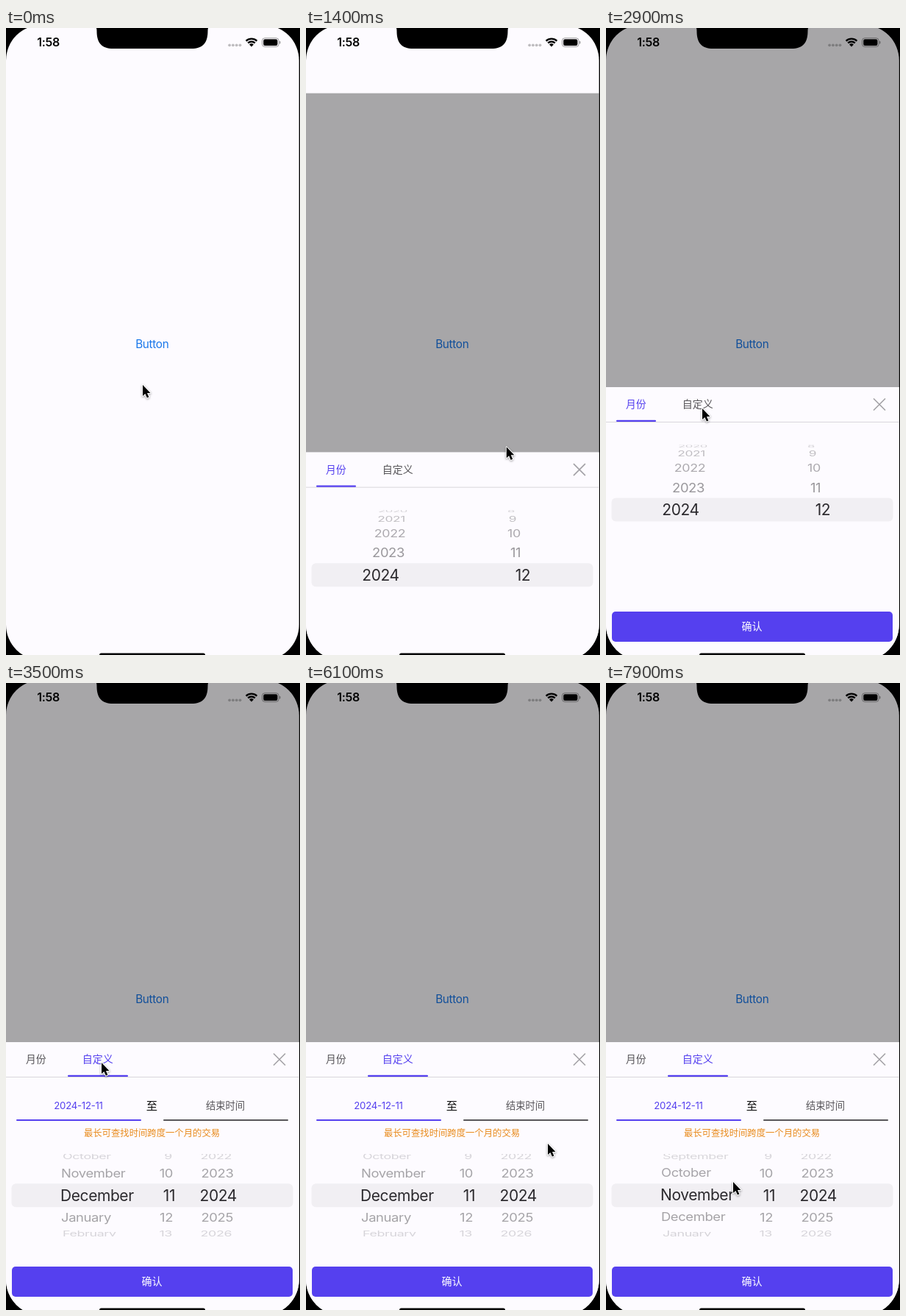
Write an HTML page with a canvas that moves like this. It is 400 px wide and 852 px high and loops after 8000 ms.

```html
<!DOCTYPE html>
<html lang="zh-CN">
<head>
<meta charset="utf-8">
<title>Date picker sheet</title>
<style>
html, body { margin: 0; width: 100%; height: 100%; overflow: hidden; background: #000; }
canvas { display: block; width: 400px; height: 852px; }
</style>
</head>
<body>
<canvas id="stage" width="400" height="852"></canvas>
<script>
const ctx = document.getElementById('stage').getContext('2d');
const W = 400, H = 852, LOOP = 8000, STEP = 100;
const FONT = 'Inter, "Noto Sans CJK SC", "Noto Sans CJK", sans-serif';
const PAPER = '#fdfbff', PURPLE = '#5540ef', GREY = '#58565a', INK = '#2b292d';
const MONTHS = ['January', 'February', 'March', 'April', 'May', 'June', 'July',
  'August', 'September', 'October', 'November', 'December'];

// time, x, y of the pointer tip
const POINTER = [
  [0, 186, 485], [100, 186, 485], [600, 196, 431], [950, 196, 433], [1200, 270, 565],
  [1900, 284, 587], [2600, 131, 517], [3000, 131, 517], [3500, 130, 516], [3800, 130, 516],
  [4600, 279, 655], [5100, 57, 518], [5300, 57, 518], [6100, 329, 626], [6400, 290, 618],
  [7000, 168, 647], [7200, 168, 647], [7650, 173, 678], [8000, 173, 678]
];
// time, month wheel position
const WHEEL = [[0, 12], [7200, 12], [7650, 11.1], [7900, 11.025], [8000, 11]];

function track(keys, t) {
  let i = 1;
  while (i < keys.length - 1 && keys[i][0] < t) i++;
  const a = keys[i - 1], b = keys[i];
  const u = Math.min(1, Math.max(0, (t - a[0]) / (b[0] - a[0])));
  const s = u * u * (3 - 2 * u);
  return a.slice(1).map((v, n) => v + (b[n + 1] - v) * s);
}

function text(str, x, y, size, color, align = 'center', weight = 400) {
  ctx.font = `${weight} ${size}px ${FONT}`;
  ctx.letterSpacing = /[\u4e00-\u9fff]/.test(str) ? '0px' : `${-0.02 * size}px`;
  ctx.textAlign = align;
  ctx.fillStyle = color;
  ctx.fillText(str, x, y);
}

function box(x, y, w, h, r, color) {
  ctx.fillStyle = color;
  ctx.beginPath();
  ctx.roundRect(x, y, w, h, r);
  ctx.fill();
}

function clipped(rects, draw) {
  ctx.save();
  ctx.beginPath();
  rects.forEach(r => ctx.rect(...r));
  ctx.clip();
  draw();
  ctx.restore();
}

// Cylinder wheel: flat magnified rows inside the bar, curved rows outside it.
function wheel(o) {
  const { mid, radius, angle, reach, rows, label, align, sel, side, drift, fade } = o;
  const pos = o.pos, near = Math.round(pos);
  const top = mid - 16, bottom = mid + 16;
  clipped([[0, top, W, 32]], () => {
    for (let i = near - 1; i <= near + 1; i++) {
      const s = label(i);
      if (s) text(s, sel, mid + (i - pos) * 32 + 7.6, 21, INK, align);
    }
  });
  clipped([[0, mid - reach, W, reach - 16], [0, bottom, W, reach - 16]], () => {
    for (let i = near - rows; i <= near + rows; i++) {
      const s = label(i), d = i - pos, k = Math.abs(d), a = d * angle;
      if (!s || Math.abs(a) > 1.5) continue;
      ctx.save();
      ctx.translate(side + drift * (k - 1), mid + radius * Math.sin(a));
      ctx.scale(1 - 0.03 * Math.max(0, k - 1), Math.cos(a) * 0.92 + 0.08);
      text(s, 0, 6.6, 18.4, `rgba(40,38,42,${fade(k)})`, align);
      ctx.restore();
    }
  });
}

function monthPage() {
  box(7.5, 638.5, 383, 32, 6, '#f1eff3');
  const drum = {
    mid: 654.5, radius: 87.7, angle: 0.349, reach: 88, rows: 4, align: 'center',
    fade: k => Math.max(0.1, 0.56 - 0.09 * k)
  };
  wheel({ ...drum, pos: 2024, label: i => i <= 2024 ? String(i) : '', sel: 101.5, side: 112, drift: 2 });
  wheel({ ...drum, pos: 12, label: i => i >= 1 && i <= 12 ? String(i) : '', sel: 295, side: 285, drift: -2 });
}

function customPage(month) {
  text('2024-12-11', 98.5, 578.6, 13.2, PURPLE);
  text('至', 198.5, 580, 15.3, '#111');
  text('结束时间', 298.5, 579, 13.3, GREY);
  box(14, 593, 170, 1.9, 1, PURPLE);
  box(214, 593, 170, 1.9, 1, GREY);
  text('最长可查找时间跨度一个月的交易', 198.5, 615.7, 12.35, '#e98b1c');

  box(7.5, 680.3, 383, 32, 6, '#f1eff3');
  const drum = {
    mid: 696, radius: 62, angle: 0.506, reach: 56, rows: 2,
    fade: k => Math.max(0.05, 0.64 - 0.23 * k)
  };
  wheel({ ...drum, pos: month, label: i => MONTHS[(i + 11) % 12], align: 'left', sel: 74, side: 75, drift: 2 });
  wheel({ ...drum, pos: 11, label: String, align: 'right', sel: 230, side: 227, drift: -1 });
  wheel({ ...drum, pos: 2024, label: String, align: 'left', sel: 263.5, side: 265.5, drift: -1 });
}

function sheet(t) {
  const custom = t >= 3000;
  ctx.fillStyle = 'rgba(0,0,0,.34)';
  ctx.fillRect(0, 0, W, 488);
  ctx.fillStyle = PAPER;
  ctx.fillRect(0, 488, W, 400);

  ctx.fillStyle = '#d9d7db';
  ctx.fillRect(0, 535, W, 1);
  text('月份', 40.8, 516.4, 13.8, custom ? GREY : PURPLE);
  text('自定义', 124.8, 516.4, 14, custom ? PURPLE : GREY);
  if (custom) box(84, 532.8, 82, 2.2, 1, PURPLE);
  else box(14, 532.8, 54, 2.2, 1, PURPLE);

  ctx.strokeStyle = '#a3a1a6';
  ctx.lineWidth = 1.6;
  ctx.beginPath();
  ctx.moveTo(364, 503.5); ctx.lineTo(380, 519.5);
  ctx.moveTo(380, 503.5); ctx.lineTo(364, 519.5);
  ctx.stroke();

  if (custom) customPage(track(WHEEL, t)[0]);
  else monthPage();

  box(8, 793, 382, 41, 5, PURPLE);
  text('确认', 198.5, 818.4, 14, '#fff');
}

function statusBar() {
  text('1:58', 57.5, 25.4, 16, '#000', 'center', 600);
  for (let i = 0; i < 4; i++) box(302.2 + i * 4.8, 21.4, 3.8, 3.8, 1.9, 'rgba(0,0,0,.25)');

  const cx = 334, cy = 25.6, up = -Math.PI / 2;
  ctx.strokeStyle = ctx.fillStyle = '#000';
  ctx.lineWidth = 2.3;
  [10.9, 7.1].forEach(r => {
    ctx.beginPath();
    ctx.arc(cx, cy, r, up - 0.75, up + 0.75);
    ctx.stroke();
  });
  ctx.beginPath();
  ctx.moveTo(cx, cy);
  ctx.arc(cx, cy, 4.3, up - 0.75, up + 0.75);
  ctx.fill();

  ctx.strokeStyle = 'rgba(0,0,0,.38)';
  ctx.lineWidth = 1;
  ctx.beginPath();
  ctx.roundRect(348.5, 13.7, 22.6, 11.8, 3.6);
  ctx.stroke();
  box(350.2, 15.3, 19.2, 8.6, 2.2, '#000');
  box(372, 17.8, 1.4, 3.8, [0, 1, 1, 0], 'rgba(0,0,0,.4)');
}

function notch() {
  ctx.fillStyle = '#000';
  ctx.beginPath();
  ctx.moveTo(122, -2);
  ctx.quadraticCurveTo(123.5, 0, 123.5, 4);
  ctx.bezierCurveTo(123.5, 20, 130, 28, 146, 28);
  ctx.lineTo(252, 28);
  ctx.bezierCurveTo(268, 28, 274.5, 20, 274.5, 4);
  ctx.quadraticCurveTo(274.5, 0, 276, -2);
  ctx.fill();
}

function pointer(x, y) {
  const pts = [[0, 0], [0, 15], [3.4, 11.9], [5.9, 17.6], [8.4, 16.5], [6, 10.9], [10.5, 10.9]];
  ctx.save();
  ctx.translate(x, y);
  ctx.beginPath();
  pts.forEach(p => ctx.lineTo(...p));
  ctx.closePath();
  ctx.lineJoin = 'round';
  ctx.lineWidth = 2;
  ctx.strokeStyle = '#fff';
  ctx.shadowColor = 'rgba(0,0,0,.4)';
  ctx.shadowBlur = 3;
  ctx.shadowOffsetY = 1;
  ctx.stroke();
  ctx.shadowColor = 'transparent';
  ctx.fillStyle = '#000';
  ctx.fill();
  ctx.restore();
}

// Critically damped slide, starting as the button is released.
function slide(t) {
  const s = Math.max(0, t - 1160) / 1000 * 16;
  return s > 10 ? 0 : H * (1 + s) * Math.exp(-s);
}

function draw(t) {
  ctx.fillStyle = '#000';
  ctx.fillRect(0, 0, W, H);
  ctx.save();
  ctx.beginPath();
  ctx.roundRect(0, -4, 398.7, 863, 48);
  ctx.clip();
  ctx.fillStyle = PAPER;
  ctx.fillRect(0, 0, W, H);
  text('Button', 198.8, 434.9, 15.3, '#1a78ea');
  const y = slide(t);
  if (y < H) {
    ctx.save();
    ctx.translate(0, y);
    sheet(t);
    ctx.restore();
  }
  statusBar();
  ctx.restore();
  notch();
  box(127, 849.4, 144, 5, 2.5, '#000');
  pointer(...track(POINTER, t));
}

const start = performance.now();
function tick() {
  const t = (performance.now() - start) % LOOP;
  draw(Math.floor(t / STEP) * STEP);
  requestAnimationFrame(tick);
}
tick();
</script>
</body>
</html>
```
